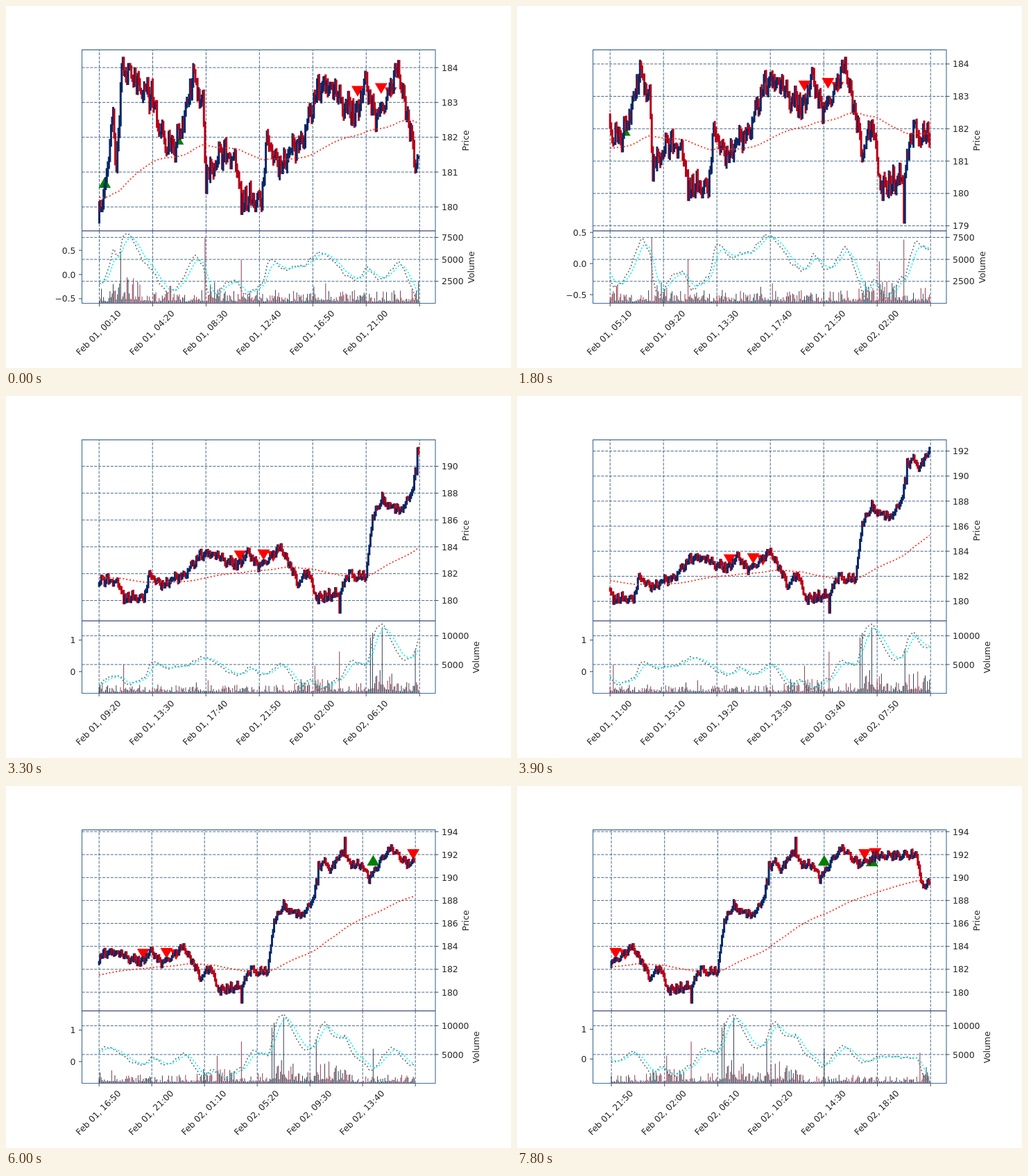
An HTML page that plays this animation: 728 by 523 pixels, repeating every 8 s.

```html
<!DOCTYPE html>
<html lang="en">
<head>
<meta charset="utf-8">
<title>Sliding price chart</title>
<style>
  html, body { margin: 0; width: 100%; height: 100%; overflow: hidden; background: #fff; }
  svg { display: block; width: 728px; height: 523px; }
  text { font: 12.4px "DejaVu Sans", sans-serif; fill: #262626; }
</style>
</head>
<body>
<svg id="chart" viewBox="0 0 728 523"></svg>
<script>
const STEP_MS = 300, LOOP_MS = 8000, LAST_STEP = 26;
const BARS = 300, SHIFT = 10, TOTAL = 560;
const LEFT = 109.5, RIGHT = 619, TOP = 63, MID = 324.8, BOTTOM = 429.5;
const UP = '#082865', DOWN = '#b80016', GRID = '#466a88', EDGE = '#3f6c9c';

// Turning points of the price: bar, value
const TURNS = [
  [0, 179.55], [6, 180.5], [12, 182.7], [16, 181.2], [22, 184.1], [50, 183.1], [57, 182], [71, 181.7],
  [89, 183.8], [97, 182.9], [100, 180.8], [118, 181.6], [131, 181], [134, 180.2], [152, 180.2],
  [157, 182], [168, 181.2], [192, 182], [204, 183.4], [216, 183.5], [238, 182.6], [250, 183.5],
  [260, 182.6], [280, 183.9], [296, 181.4], [306, 182.1], [313, 180.3], [335, 180.4], [342, 181.9],
  [360, 181.8], [366, 186.4], [375, 187.3], [392, 186.7], [401, 187.6], [411, 191.4], [420, 190.8],
  [433, 192.4], [439, 191], [449, 191.2], [456, 189.9], [476, 192.5], [493, 191.2], [510, 191.9],
  [547, 192], [551, 189.4], [560, 189.4]
];
const PRICE_SPIKES = {
  0: 180.1, 22: 184.28, 133: 179.8, 280: 184.19, 315: 179.8, 335: 179.1, 375: 187.9, 408: 191.25, 433: 193.46
};
const VOLUME_SPIKES = {
  20: 5900, 99: 7500, 133: 4980, 312: 4780, 335: 7250, 364: 9700, 366: 10500, 375: 11450,
  406: 7600, 460: 6000, 550: 5300
};
// Bar, price, direction, half width
const MARKERS = [
  [5, 180.7, 1, 9], [75, 181.9, 1, 6.5], [460, 191.5, 1, 9], [505, 191.45, 1, 9],
  [242, 183.32, -1, 9], [264, 183.4, -1, 9], [273, 183.28, -1, 9], [498, 192, -1, 9], [508, 192.1, -1, 9]
];

let seed = 20;
function random() {
  seed = (seed * 1664525 + 1013904223) % 4294967296;
  return seed / 4294967296;
}

const clamp = (v, lo, hi) => Math.min(hi, Math.max(lo, v));
const range = n => Array.from({ length: n }, (_, i) => i);

function trend(n) {
  const i = TURNS.findIndex(([end]) => end > n);
  const [n0, p0] = TURNS[i - 1], [n1, p1] = TURNS[i];
  return p0 + (p1 - p0) * (n - n0) / (n1 - n0);
}

function makeCandles() {
  let close = TURNS[0][1];
  return range(TOTAL).map(n => {
    const bound = v => clamp(v, 179.88, n < 360 ? 184.1 : 193);
    const open = close, wick = random() * 0.14;
    const swing = 0.22 * Math.sin(n * 1.2 + 2 * Math.sin(n * 0.37)) + (random() - 0.5) * 0.42;
    close = PRICE_SPIKES[n] ?? bound(trend(n) + swing);
    const lo = Math.min(open, close), hi = Math.max(open, close);
    return {
      close,
      up: close >= open,
      lo: Math.min(lo, bound(lo - wick)),
      hi: Math.max(hi, bound(hi + wick))
    };
  });
}

// Exponential moving average
function ema(data, span, value) {
  return data.map(v => value += (v - value) * 2 / (span + 1));
}

const candles = makeCandles();
const closes = candles.map(c => c.close);
const average = ema(closes, 200, 180.28);
const slow = ema(closes, 26, 180.3);
const momentum = ema(closes, 12, 180.1).map((v, n) => v - slow[n]);
const signal = ema(momentum, 9, -0.1);

// Trading is busier while the price moves fast
const volumes = momentum.map((m, n) => {
  const usual = (1000 + 2000 * Math.abs(m)) * (0.18 + 1.05 * random() ** 2.5);
  return VOLUME_SPIKES[n] ?? usual;
});

// Value axis with round ticks
function axis(lo, hi, top, bottom, maxTicks) {
  const raw = (hi - lo) / maxTicks, unit = 10 ** Math.floor(Math.log10(raw));
  const step = [1, 2, 2.5, 5, 10].find(s => s * unit >= raw) * unit;
  const ticks = [];
  for (let i = Math.ceil(lo / step); i * step <= hi; i++) ticks.push(i * step);
  return { ticks, step, y: v => bottom - (v - lo) / (hi - lo) * (bottom - top) };
}

function paddedAxis(lo, hi, top, bottom, maxTicks) {
  const pad = (hi - lo) * 0.05;
  return axis(lo - pad, hi + pad, top, bottom, maxTicks);
}

const px = v => v.toFixed(2);
const line = (x1, y1, x2, y2) => `M${px(x1)} ${px(y1)}L${px(x2)} ${px(y2)}`;
const path = (d, color, width, extra = '') =>
  `<path d="${d}" fill="none" stroke="${color}" stroke-width="${width}" ${extra}/>`;
const label = (x, y, text, anchor = 'start', turn = 0) =>
  `<text text-anchor="${anchor}" transform="translate(${px(x)} ${px(y)}) rotate(${turn})">${text}</text>`;

function timeLabel(minutes) {
  const two = v => String(v).padStart(2, '0');
  const day = 1 + Math.floor(minutes / 1440), m = minutes % 1440;
  return `Feb ${two(day)}, ${two(Math.floor(m / 60))}:${two(m % 60)}`;
}

function draw(step) {
  const first = step * SHIFT, last = first + BARS - 1;
  const bars = range(BARS).map(i => first + i);
  const marks = MARKERS.filter(([n]) => n >= first && n <= last);

  // Markers close to an edge squeeze the time axis
  const padLeft = Math.max(0, ...marks.map(([n]) => 8 - 1.54 * (n - first)));
  const padRight = Math.max(0, ...marks.map(([n]) => 7.6 - 1.54 * (last - n)));
  const pitch = (462 - padLeft - padRight) / BARS;
  const x = n => 134.2 + padLeft + (n - first) * pitch;

  const price = paddedAxis(
    Math.min(...bars.map(n => candles[n].lo)), Math.max(...bars.map(n => candles[n].hi)), TOP, MID, 9);
  const volume = axis(0, 1.1 * Math.max(...bars.map(n => volumes[n])), MID, BOTTOM, 4);
  const shown = bars.map(n => momentum[n]);
  const macd = paddedAxis(Math.min(...shown), Math.max(...shown), MID, BOTTOM, 4);
  const columns = range(7).map(j => x(first + j * 50));

  let grid = '', ticks = '', texts = '';
  for (const a of [price, volume]) {
    for (const v of a.ticks.filter(v => v > 0)) {
      const y = a.y(v);
      grid += line(LEFT, y, RIGHT, y);
      ticks += line(RIGHT, y, RIGHT + 4.5, y);
      texts += label(628, y + 4.6, v);
    }
  }
  for (const v of macd.ticks) {
    const y = macd.y(v);
    ticks += line(LEFT - 4.5, y, LEFT, y);
    texts += label(100.5, y + 4.6, v.toFixed(macd.step < 1 ? 1 : 0).replace('-', '\u2212'), 'end');
  }
  columns.forEach((cx, j) => {
    grid += line(cx, MID, cx, TOP) + line(cx, BOTTOM, cx, MID);
    ticks += line(cx, BOTTOM, cx, BOTTOM + 4.5);
    if (j < 6) texts += label(cx + 2, 475, timeLabel(10 + step * 50 + j * 250), 'middle', -45);
  });
  texts += label(667, 194.5, 'Price', 'middle', -90);
  texts += label(volume.step > 2500 ? 682 : 674.5, 377.5, 'Volume', 'middle', -90);

  const triangles = marks.map(([n, p, dir, r]) => {
    const cx = x(n), cy = price.y(p), h = r * 0.86 * dir;
    const points = [[cx - r, cy + h], [cx + r, cy + h], [cx, cy - h]].map(q => q.map(px).join()).join(' ');
    return `<polygon points="${points}" fill="${dir > 0 ? '#008000' : '#ff0000'}"/>`;
  }).join('');

  const sticks = bars.map(n => {
    const c = candles[n];
    return path(line(x(n), price.y(c.lo), x(n), price.y(c.hi)), c.up ? UP : DOWN, 3, 'stroke-linecap="square"');
  }).join('');

  const volumePath = up => bars.filter(n => candles[n].up === up)
    .map(n => line(x(n), BOTTOM, x(n), volume.y(volumes[n]))).join('');

  const dotted = (data, scale, color) => {
    const d = 'M' + bars.map(n => `${px(x(n))} ${px(scale.y(data[n]))}`).join('L');
    return path(d, color, 1.8, 'stroke-dasharray="1.9 3"');
  };

  document.getElementById('chart').innerHTML =
    path(grid, GRID, 1, 'stroke-dasharray="4.1 1.8"') +
    triangles + sticks + dotted(average, price, '#ff2a1a') +
    path(volumePath(true), '#1c2a3c', 0.9) + path(volumePath(false), '#84263a', 0.9) +
    dotted(momentum, macd, '#757575') + dotted(signal, macd, '#00f4ff') +
    path(`M${LEFT} ${TOP + 0.4}H${RIGHT}V${BOTTOM}H${LEFT}Z`, EDGE, 1.1) +
    path(line(LEFT, MID, RIGHT, MID), '#3a4680', 1.2) +
    path(ticks, '#3c4a58', 1) + texts;
}

let current = -1;
const start = performance.now();
function tick() {
  const t = (performance.now() - start) % LOOP_MS;
  const step = Math.min(LAST_STEP, Math.floor(t / STEP_MS));
  if (step !== current) draw(current = step);
  requestAnimationFrame(tick);
}
tick();
</script>
</body>
</html>
```
